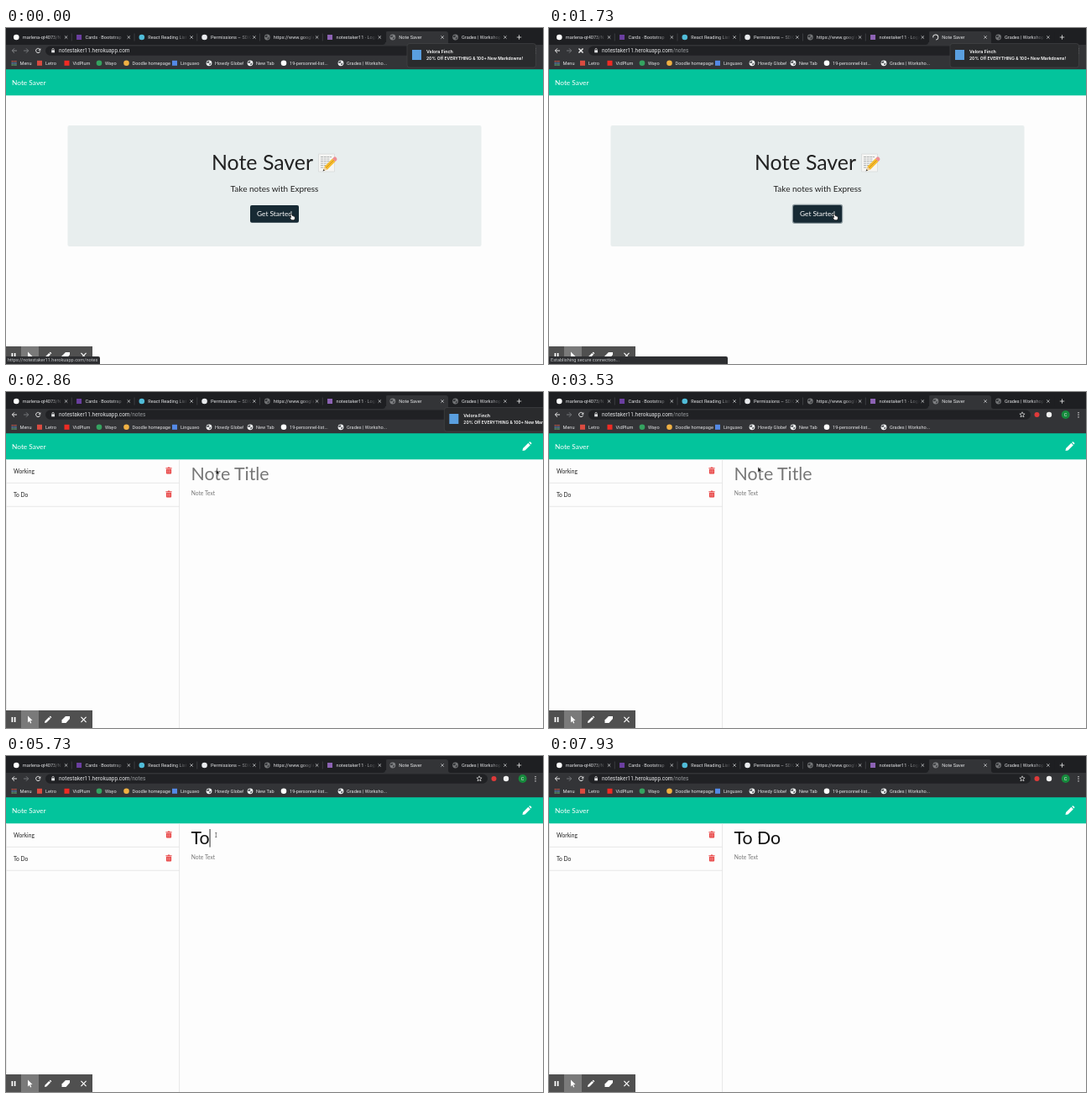
These frames come from a looping animation (640x400 px, 8000 ms). An HTML page:

```html
<!DOCTYPE html>
<html lang="en">
<head>
<meta charset="utf-8">
<title>Note Saver</title>
<style>
html, body { margin: 0; width: 100%; height: 100%; overflow: hidden; background: #fdfdfd; }
svg { display: block; width: 640px; height: 400px; }
text { white-space: pre; }
.ui { font-family: Roboto, Inter, sans-serif; font-size: 5.6px; fill: #e3e4e6; }
.page { font-family: Lato, sans-serif; font-size: 6.67px; fill: #222; }
.mid { text-anchor: middle; }
.line { fill: none; stroke: #e8e8e8; stroke-width: 1; }
.soft { stroke: #dfdfdf; stroke-width: .7; }
</style>
</head>
<body>
<svg viewBox="0 0 640 400">
  <defs>
    <linearGradient id="fade"><stop stop-color="#1e1f22" stop-opacity="0"/><stop offset="1" stop-color="#1e1f22"/></linearGradient>
    <g id="globe">
      <circle r="3.4" fill="#f1f3f4"/>
      <path d="M-2.7-1.6L-.5-2.6L.6-1.2L-.8.2L-2.6 0ZM.2.8L2.4-.2L1.8 2L.4 2.5Z" fill="#54575b"/>
    </g>
    <g id="trash" fill="#e84545">
      <path d="M-3.6-3.2H-1.4L-.9-4H.9L1.4-3.2H3.6V-2.2H-3.6Z"/>
      <path d="M-3.1-1.7H3.1V3.2Q3.1 4.1 2.2 4.1H-2.2Q-3.1 4.1-3.1 3.2Z"/>
      <path d="M-1.4-.7V3M0-.7V3M1.4-.7V3" stroke="#f7b5b5" stroke-width=".5"/>
    </g>
    <path id="pencil" d="M-5.3 5.3L-4.7 2.2L1.6-4.1L4.1-1.6L-2.2 4.7ZM2.3-4.8L3-5.4Q3.6-5.8 4.2-5.3L5.3-4.2Q5.8-3.6 5.4-3L4.8-2.3Z"/>
    <path id="cross" d="M-1.7-1.7L1.7 1.7M1.7-1.7L-1.7 1.7" fill="none"/>
  </defs>

  <rect width="640" height="400" fill="#fdfdfd"/>
  <rect y="49" width="640" height="31.3" fill="#03c49c"/>
  <text class="page" x="7" y="68" style="font-size:8.33px;fill:#fff">Note Saver</text>

  <g data-show="0 1930">
    <rect x="73.5" y="116" width="493" height="144" rx="2" fill="#e8eeee"/>
    <g class="page">
      <text x="245" y="168.5" style="font-size:24.9px">Note Saver</text>
      <text class="mid" x="320" y="194.5" style="font-size:10px">Take notes with Express</text>
      <rect data-show="860 1930" x="289.8" y="209.8" width="60.4" height="23.2" rx="3" fill="#8b989d"/>
      <rect x="291" y="211" width="58" height="20.8" rx="2" fill="#172a34"/>
      <text class="mid" x="320" y="224.4" style="font-size:8.33px;fill:#fff">Get Started</text>
    </g>
    <g>
      <path d="M372.5 150H391.5V171H372.5Z" fill="#f5f5f3" stroke="#d5d7d7" stroke-width=".7"/>
      <path d="M375 153.5h13M375 156h11M375 158.5h13M375 161h10M375 163.5h8M375 166h6" stroke="#9a9d9f" stroke-width=".8" stroke-dasharray="3 .7"/>
      <path d="M378 170L379.5 165L389 155.5L392.5 159L383 168.5Z" fill="#f5bd2e"/>
      <path d="M381 166.8L390.8 157.2" stroke="#d9921c"/>
      <path d="M389 155.5L390.6 153.9Q392.2 152.6 393.6 154.2Q395.3 156 394 157.5L392.5 159Z" fill="#ee8d93"/>
      <path d="M378 170L379.5 165L383 168.5Z" fill="#efd3a4"/>
      <path d="M377.6 170.4L378.4 168.2L380 169.5Z" fill="#333"/>
    </g>
  </g>

  <g data-show="1930 8000">
    <path class="line soft" d="M.4 80.5V400M206.6 80.5V400M0 108.3H206.5M0 136.3H206.5"/>
    <g class="page">
      <text x="9" y="97">Working</text>
      <text x="9" y="125">To Do</text>
      <text x="220.8" y="122.6" style="fill:#777">Note Text</text>
      <text id="title" x="220.5" y="105" style="font-size:21.33px"></text>
    </g>
    <use href="#trash" x="194" y="93.4"/>
    <use href="#trash" x="194" y="121.4"/>
    <use href="#pencil" x="620.8" y="64.8" fill="#fff"/>
    <rect id="caret" y="87" width=".9" height="21.5" fill="#111"/>
  </g>

  <g id="browser" class="ui">
    <rect width="640" height="49.2" fill="#333437"/>
    <rect width="640" height="20" fill="#1e1f22"/>
    <path d="M449 20Q452 20 452 17V7Q452 4 455 4H524Q527 4 527 7V17Q527 20 530 20Z" fill="#333437"/>
    <g id="tabs"></g>
    <path d="M608.8 11H614.2M611.5 8.3V13.7" class="line" style="stroke-width:.8"/>
    <rect x="47" y="21.5" width="527" height="11.2" rx="5.6" fill="#202124"/>
    <path id="back" class="line" d="M13 27H7.4M10 24.3L7.3 27L10 29.7"/>
    <path class="line" style="stroke:#75777a" d="M21 27H26.6M24 24.3L26.7 27L24 29.7"/>
    <g data-show="0 860 1930 8000">
      <path class="line" d="M40.4 25.5A2.6 2.6 0 1 0 40.7 27.7"/>
      <path d="M41.3 23.9V26.8H38.4Z"/>
    </g>
    <use data-show="860 1930" href="#cross" stroke="#e8e8e8" transform="matrix(1.5 0 0 1.5 38 27)"/>
    <path d="M54.2 26.3H58V29.3H54.2Z"/>
    <path class="line" style="stroke-width:.7" d="M55 26.3V25.4A1.1 1.1 0 0 1 57.2 25.4V26.3"/>
    <text x="63" y="29.2" style="font-size:6.48px">notestaker11.herokuapp.com<tspan data-show="860 8000" fill="#96999c">/notes</tspan></text>
    <path class="line" style="stroke-width:.7" d="M564 23.8L564.9 25.9L567.1 26.1L565.4 27.5L566 29.8L564 28.6L562 29.8L562.6 27.5L560.9 26.1L563.1 25.9Z"/>
    <circle cx="581.5" cy="27" r="3" fill="#df3a3a"/>
    <circle cx="596" cy="27" r="3.2" fill="#f1f1f1"/>
    <circle cx="615.7" cy="27" r="5" fill="#168a3c"/>
    <text class="mid" x="615.7" y="29">C</text>
    <path d="M631 24V30.5" stroke="#e8e8e8" stroke-width="1.2" stroke-dasharray="1.2 1.4"/>
    <g id="marks"></g>
  </g>

  <g>
    <rect y="379" width="103" height="21" fill="#505050"/>
    <rect x="18" y="379" width="21" height="21" fill="#7a7a7a"/>
    <path d="M7.4 387V393M10.6 387V393" stroke="#fff" stroke-width="1.7"/>
    <path d="M26 385.5L31.5 391L29 391.2L30.3 394L29.1 394.5L27.9 391.8L26 393.4Z" fill="#fff"/>
    <use href="#pencil" transform="matrix(.75 0 0 .75 50 390)" fill="#fff"/>
    <path d="M66.5 394V390.5L71 386H76V389L71.5 394Z" fill="#fff"/>
    <use href="#cross" transform="matrix(1.8 0 0 1.8 92.5 390)" stroke="#fff" stroke-width=".65"/>
  </g>

  <g id="status" class="ui">
    <path id="statusBox" fill="#2d2e31"/>
    <text id="statusText" x="2" y="397.3" fill="#c5c7c9"></text>
  </g>

  <g id="notice" class="ui">
    <rect x="478" y="18.5" width="153.5" height="28.5" rx="3" fill="#2a2b2d" stroke="#47484a" stroke-width=".6"/>
    <rect x="484" y="26" width="11" height="12" fill="#5a9fdf"/>
    <g style="font-weight:600;font-family:Inter,sans-serif;font-size:5.3px;fill:#fff">
      <text x="501" y="30.4">Velora Finch</text>
      <text x="501" y="38.4" style="font-size:5px">20% Off EVERYTHING &amp; 100+ New Markdowns!</text>
    </g>
  </g>

  <g id="mouse">
    <path data-show="0 2200" d="M-1.8-3.6Q-.9-4.3-.4-3.2L.3-1.4Q1-2 1.5-1.1Q2.2-1.5 2.6-.6Q3.4-.7 3.4.3V1.8Q3.4 3.8 1.8 3.8H-.3Q-1.3 3.2-3 .9Q-2.7 0-1.4.6L-2.2-2.5Q-2.3-3.2-1.8-3.6Z" fill="#fff" stroke="#111" stroke-width=".8"/>
    <path data-show="2200 5130" d="M0-3.5V3.2L1.4 2L2.3 4.1L3.4 3.6L2.5 1.6H4.4Z" fill="#111" stroke="#fff" stroke-width=".5"/>
    <path data-show="5130 8000" d="M.3-1H2.3M1.3-1V4M.3 4H2.3" fill="none" stroke="#333" stroke-width=".6"/>
  </g>
</svg>

<script>
const LOOP = 8000;
const CLICK = 860, LOADED = 1930;
const $ = id => document.getElementById(id);
const icon = (kind, x, y, color) =>
  kind === 'globe' ? `<use href="#globe" x="${x}" y="${y}"/>` :
  kind === 'dim' ? `<use href="#globe" x="${x}" y="${y}" opacity=".4"/>` :
  kind === 'dot' ? `<circle cx="${x}" cy="${y}" r="3.3" fill="${color}"/>` :
  `<rect x="${x - 3}" y="${y - 3}" width="6" height="6" fill="${color}"/>`;

const tabs = [
  ['marlena-qt4073/N', 'dot', '#fff'],
  ['Cards · Bootstrap', 'box', '#6b3fa0'],
  ['React Reading List', 'dot', '#50bcd8'],
  ['Permissions – SDK', 'dot', '#e8eaed'],
  ['https://www.google', 'dim'],
  ['notestaker11 · Logs', 'box', '#8d63b5'],
  ['Note Saver', 'dim'],
  ['Grades | Workshop', 'dim']
];
$('tabs').innerHTML = tabs.map(([label, kind, color], i) => {
  const x = 12.3 + i * 74.75, active = i === 6;
  const mark = icon(kind, x, 11, color);
  const shown = active ? `<g data-show="0 ${CLICK} ${LOADED} ${LOOP}">${mark}</g>
    <path id="spinner" data-show="${CLICK} ${LOADED}" class="line" d="M460.8 8A3 3 0 1 1 457.8 11"/>` : mark;
  const edge = active ? '' : `<rect x="${x + 40}" y="5" width="15" height="12" fill="url(#fade)"/>
    <rect x="${x + 55}" y="5" width="12" height="12" fill="#1e1f22"/>`;
  const divider = i < 5 ? `<path d="M${x + 66} 6.5V15.5" stroke="#505256" stroke-width=".6"/>` : '';
  return `${shown}<text x="${x + 7.5}" y="13">${label}</text>${edge}${divider}
    <use href="#cross" x="${x + 59.3}" y="11" stroke="#d2d4d6" stroke-width=".75"/>`;
}).join('');

const marks = [
  [9.5, 'Menu', 'grid'],
  [40, 'Letro', 'box', '#d94b40'],
  [72.5, 'VidPlum', 'box', '#ee2b24'],
  [111, 'Wayo', 'dot', '#35a260'],
  [143.5, 'Doodle homepage', 'dot', '#efb043'],
  [201, 'Linguavo', 'box', '#5489e5'],
  [242, 'Howdy Globe!', 'globe'],
  [291, 'New Tab', 'globe'],
  [331, '19-personnel-list...', 'dot', '#fff'],
  [399, 'Grades | Worksho...', 'globe']
];
const grid = x => [0, 1, 2].map(row => `<path d="M${x - 2.8} ${39.6 + row * 2.2}h6"
  stroke="${['#e06055', '#71a7e8', '#69b578'][row]}" stroke-width="1.3" stroke-dasharray="1.4 .8"/>`).join('');
$('marks').innerHTML = marks.map(([x, label, kind, color]) =>
  (kind === 'grid' ? grid(x) : icon(kind, x, 41.8, color)) +
  `<text x="${x + 7}" y="43.8">${label}</text>`).join('');

const timed = [...document.querySelectorAll('[data-show]')].map(el => [el, el.dataset.show.split(' ').map(Number)]);

const path = [[0, 341, 225], [2200, 341, 225], [2530, 262, 108], [2900, 250, 95], [3330, 249, 92.5], [LOOP, 249, 92.5]];
const typing = [[0, ''], [4660, 't'], [5130, ''], [5330, 'T'], [5600, 'To'], [5860, 'To '], [6200, 'To D'], [6400, 'To Do']];
const FOCUS = 3800;
const smooth = u => u * u * (3 - 2 * u);
const clamp = u => Math.max(0, Math.min(1, u));
const move = (id, x, y) => $(id).setAttribute('transform', `matrix(1 0 0 1 ${x} ${y})`);

function pointAt(t) {
  const i = path.findIndex((p, n) => n && t <= p[0]);
  const [t0, x0, y0] = path[i - 1], [t1, x1, y1] = path[i];
  const u = smooth((t - t0) / (t1 - t0));
  return [x0 + (x1 - x0) * u, y0 + (y1 - y0) * u];
}

function drawTitle(t) {
  const [since, typed] = typing.filter(([at]) => at <= t).pop();
  const title = $('title');
  title.textContent = typed || 'Note Title';
  title.style.fill = typed ? '#111' : '#777';
  const lit = t >= FOCUS && Math.floor((t - Math.max(since, FOCUS)) / 500) % 2 === 0;
  $('caret').setAttribute('x', 220.5 + (typed ? title.getComputedTextLength() : 0));
  $('caret').style.display = lit ? '' : 'none';
}

function drawStatus(t) {
  const width = t < CLICK ? 112 : 213;
  $('statusBox').setAttribute('d', `M0 391H${width - 2}Q${width} 391 ${width} 393V400H0Z`);
  $('statusText').textContent = t < CLICK ? 'https://notestaker11.herokuapp.com/notes' : 'Establishing secure connection...';
  $('status').style.opacity = 1 - clamp((t - LOADED) / 270);
}

function draw(t) {
  for (const [el, spans] of timed) {
    const on = spans.some((start, i) => i % 2 === 0 && t >= start && t < spans[i + 1]);
    el.style.display = on ? '' : 'none';
  }
  drawTitle(t);
  drawStatus(t);
  $('back').style.stroke = t < CLICK ? '#85878a' : '#e8e8e8';
  $('spinner').setAttribute('transform', `rotate(${t * .36} 460.8 11)`);
  move('notice', 165 * smooth(clamp((t - 2650) / 620)), 0);
  move('mouse', ...pointAt(t));
}

const start = performance.now();
function tick() {
  draw((performance.now() - start) % LOOP);
  requestAnimationFrame(tick);
}
tick();
</script>
</body>
</html>
```
